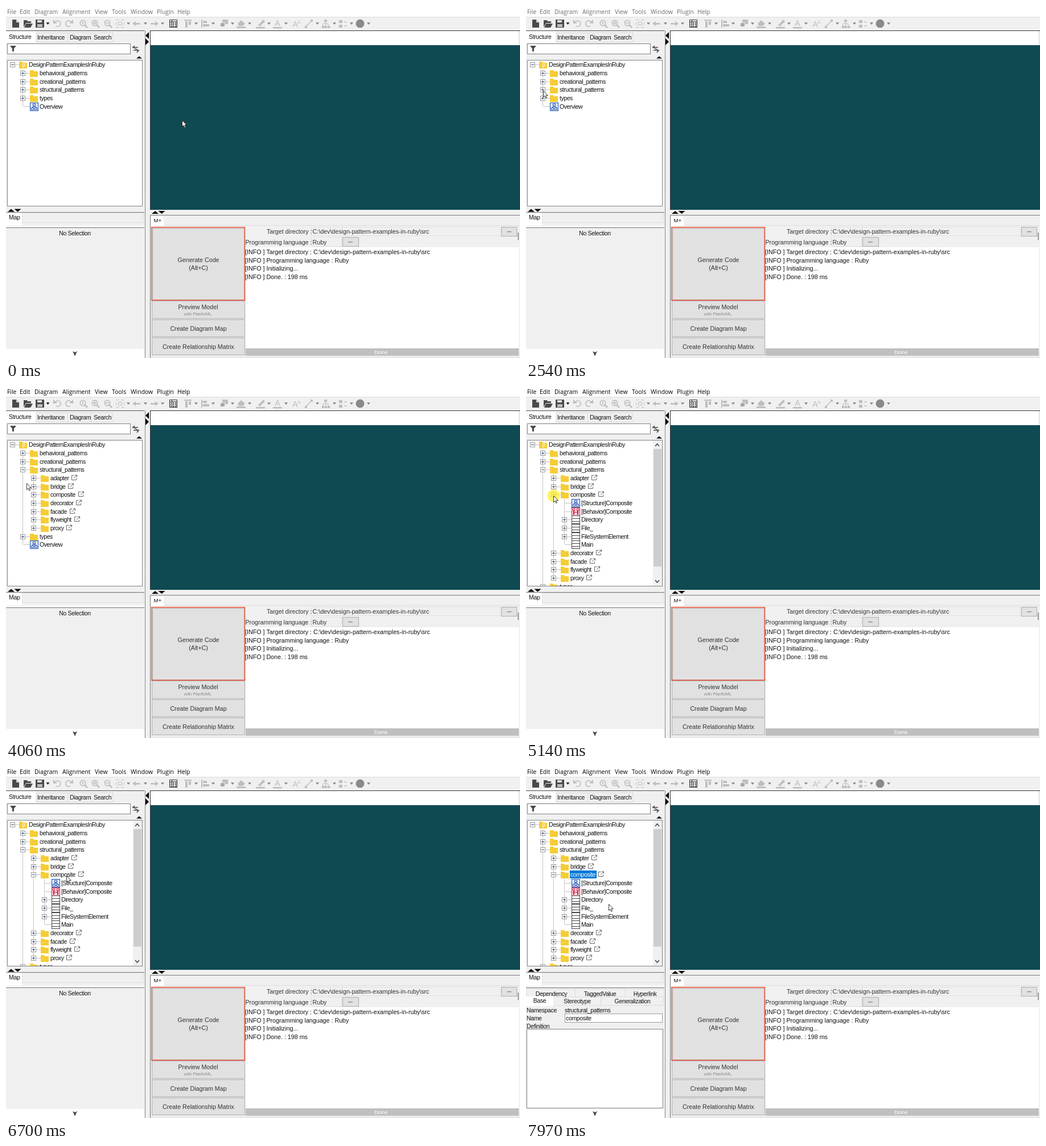
Write an HTML page with a canvas that moves like this. It is 903 by 620 pixels and loops after 8000 ms.

```html
<!DOCTYPE html>
<html lang="en">
<head>
<meta charset="utf-8">
<title>Model tree</title>
<style>
html, body { margin: 0; width: 100%; height: 100%; overflow: hidden; background: #f0f0f0; }
canvas { display: block; }
</style>
</head>
<body>
<canvas id="stage" width="903" height="620"></canvas>
<script>
const LOOP = 8000;
const ctx = document.getElementById('stage').getContext('2d');
const ARIAL = '"Liberation Sans", Arial, sans-serif';
const MENU = '"Open Sans", "Noto Sans", sans-serif';
const PANEL = '#f0f0f0', DARK = '#4a4a4a', PALE = '#bebebe', EDGE = '#828282', SOFT = '#333';

function rect(x, y, w, h, fill, edge) {
  if (fill) { ctx.fillStyle = fill; ctx.fillRect(x, y, w, h); }
  if (edge) { ctx.strokeStyle = edge; ctx.lineWidth = 1; ctx.strokeRect(x + .5, y + .5, w - 1, h - 1); }
}

function poly(points, fill, edge, width = 1, open = false) {
  ctx.beginPath();
  points.forEach(([x, y], i) => i ? ctx.lineTo(x, y) : ctx.moveTo(x, y));
  if (!open) ctx.closePath();
  if (fill) { ctx.fillStyle = fill; ctx.fill(); }
  if (edge) { ctx.strokeStyle = edge; ctx.lineWidth = width; ctx.stroke(); }
}

const line = (x1, y1, x2, y2, color, width = 1) => poly([[x1, y1], [x2, y2]], null, color, width, true);

function ring(x, y, r, color, width, from = 0, to = Math.PI * 2) {
  ctx.beginPath();
  ctx.arc(x, y, r, from, to);
  ctx.strokeStyle = color;
  ctx.lineWidth = width;
  ctx.stroke();
}

function disc(x, y, r, fill) {
  ctx.beginPath();
  ctx.arc(x, y, r, 0, Math.PI * 2);
  ctx.fillStyle = fill;
  ctx.fill();
}

function text(str, x, y, { size = 10.7, color = '#111', align = 'left', spacing = 0, family = ARIAL } = {}) {
  ctx.font = `${size}px ${family}`;
  ctx.letterSpacing = `${spacing}px`;
  ctx.textAlign = align;
  ctx.fillStyle = color;
  ctx.fillText(str, x, y);
}

const label = (str, x, y, align) => text(str, x, y, { size: 10.5, spacing: -.35, align });

// Triangle with its centre at (x, y), pointing along (dx, dy)
function arrowHead(x, y, dx, dy, half, depth, fill) {
  const h = depth / 2;
  poly([[x + dx * h, y + dy * h],
        [x - dx * h - dy * half, y - dy * h + dx * half],
        [x - dx * h + dy * half, y - dy * h - dx * half]], fill);
}

// ---- Menu and toolbar ----

function drawMenu(focused) {
  rect(0, 0, 903, 20, '#fff');
  const items = [['File', 2], ['Edit', 24], ['Diagram', 50], ['Alignment', 99], ['View', 156],
    ['Tools', 186], ['Window', 219], ['Plugin', 265], ['Help', 301]];
  for (const [name, x] of items)
    text(name, x, 14, { size: 10.4, family: MENU, color: focused ? '#000' : '#6d6d6d' });
}

function magnifier(x, sign) {
  ring(x - 1, 30, 4.7, PALE, 1.7);
  line(x + 2.5, 33.5, x + 7, 38, PALE, 2.5);
  if (sign) line(x - 4, 30, x + 2, 30, PALE, 1.5);
  if (sign === '+') line(x - 1, 27, x - 1, 33, PALE, 1.5);
  if (!sign) rect(x - 2, 28, 2, 4, PALE);
}

function drawToolbar() {
  rect(0, 20, 903, 23, PANEL);
  line(0, 19.5, 903, 19.5, '#dcdcdc');
  poly([[11, 24], [18, 24], [23, 29], [23, 38], [11, 38]], DARK);
  poly([[18, 24], [18, 29], [23, 29]], '#d0d0d0');
  poly([[31, 25], [37, 25], [38, 27], [44, 27], [44, 30], [35, 30], [31, 37]], DARK);
  poly([[35, 31], [47, 31], [43, 38], [32, 38]], DARK);
  rect(52, 24, 15, 14, DARK);
  rect(55, 25, 8, 4, '#e4e4e4');
  rect(55, 32, 9, 5, '#bdbdbd');

  ring(91, 31, 5, PALE, 1.6, -2.4, 2.2);
  poly([[83, 24], [83, 31], [90, 30]], PALE);
  ring(110, 31, 5, PALE, 1.6, 1, 5.5);
  poly([[118, 24], [118, 31], [111, 30]], PALE);
  magnifier(136);
  magnifier(157, '+');
  magnifier(179, '-');
  ctx.setLineDash([5, 4]);
  rect(193, 24, 15, 14, null, PALE);
  ctx.setLineDash([]);
  rect(197, 28, 7, 6, PANEL, PALE);
  for (const [x, d] of [[230, -1], [260, 1]]) {
    rect(x - 6, 30, 12, 2.5, PALE);
    arrowHead(x + d * 5, 31, d, 0, 4, 6, PALE);
  }
  rect(287, 24, 14, 14, '#fff', '#333');
  line(287, 27.5, 301, 27.5, '#333');
  line(291.5, 24, 291.5, 38, '#333');
  for (let y = 29; y < 37; y += 3) {
    rect(288.5, y, 2, 1.5, DARK);
    rect(293, y, 2.5, 2, DARK);
    rect(297, y, 2.5, 2, DARK);
  }

  rect(313, 24, 13, 2, PALE);
  rect(315, 27, 4, 11, PALE);
  rect(321, 27, 4, 6, PALE);
  rect(343, 24, 2, 14, PALE);
  rect(346, 26, 7, 4, PALE);
  rect(346, 32, 11, 4, PALE);
  rect(380, 24, 10, 8, PALE);
  rect(376, 29, 9, 8, '#a8a8a8', PANEL);
  poly([[407, 31], [413, 25], [420, 31], [416, 35], [409, 35]], PALE);
  rect(405, 36, 16, 3, PALE);
  poly([[443, 34], [452, 24], [455, 27], [446, 36]], PALE);
  rect(439, 37, 16, 2.5, PALE);
  text('A', 477, 35, { size: 14, color: PALE, align: 'center' });
  rect(469, 37, 16, 2.5, PALE);
  text('A', 508, 37, { size: 14, color: PALE, align: 'center' });
  text('A', 515, 32, { size: 9, color: PALE, align: 'center' });
  line(527, 36, 537, 26, PALE, 1.5);
  rect(525, 35, 4, 4, PALE);
  rect(535, 24, 4, 4, PALE);
  rect(559, 24, 5, 4, PALE);
  poly([[557, 35], [557, 31], [566, 31], [566, 35]], null, PALE, 1, true);
  line(561.5, 27, 561.5, 36, PALE);
  for (const x of [555, 560, 565]) rect(x, 35, 4, 4, PALE);
  rect(585, 25, 6, 5, PALE);
  rect(585, 33, 6, 5, PALE);
  rect(594, 27, 5, 2, '#d0d0d0');
  rect(594, 34, 5, 2, '#d0d0d0');
  disc(622, 31, 7.5, '#8a8a8a');
  arrowHead(73.5, 31, 0, 1, 3, 4, '#222');
  for (const x of [215, 245, 275, 334, 364, 398, 428, 462, 492, 547, 577, 607, 637])
    arrowHead(x, 31, 0, 1, 3, 4, '#888');
}

// ---- Tree ----

const leaf = (level, kind, name, box, link) => ({ level, kind, name, box, link });

function treeRows(openStructural, openComposite) {
  const rows = [
    leaf(0, 'root', 'DesignPatternExamplesInRuby', '-'),
    leaf(1, 'folder', 'behavioral_patterns', '+'),
    leaf(1, 'folder', 'creational_patterns', '+'),
    leaf(1, 'folder', 'structural_patterns', openStructural ? '-' : '+')];
  if (openStructural) {
    for (const name of ['adapter', 'bridge', 'composite', 'decorator', 'facade', 'flyweight', 'proxy']) {
      const open = openComposite && name === 'composite';
      rows.push(leaf(2, 'folder', name, open ? '-' : '+', true));
      if (open) rows.push(
        leaf(3, 'structure', '[Structure]Composite'),
        leaf(3, 'behavior', '[Behavior]Composite'),
        leaf(3, 'class', 'Directory', '+'),
        leaf(3, 'class', 'File_', '+'),
        leaf(3, 'class', 'FileSystemElement', '+'),
        leaf(3, 'class', 'Main'));
    }
  }
  rows.push(leaf(1, 'folder', 'types', '+'), leaf(1, 'structure', 'Overview'));
  return rows;
}

function drawIcon(kind, x, y) {
  if (kind === 'folder' || kind === 'root') {
    poly([[x - 7, y - 5], [x - 1, y - 5], [x, y - 3], [x + 7, y - 3], [x + 7, y + 7], [x - 7, y + 7]], '#f6cd34');
    if (kind === 'root') text('p', x + 1, y + 4, { size: 10, color: '#fff', align: 'center' });
  } else if (kind === 'class') {
    rect(x - 7, y - 7, 15, 15, '#fff', '#444');
    line(x - 7, y - 1.5, x + 8, y - 1.5, '#444');
    line(x - 7, y + 3.5, x + 8, y + 3.5, '#444');
  } else if (kind === 'structure') {
    rect(x - 7, y - 7, 15, 15, '#dce8fb', '#1f4fae');
    rect(x - 2, y - 5, 5, 4, '#fff', '#1f4fae');
    rect(x - 5, y + 2, 5, 4, '#fff', '#1f4fae');
    rect(x + 1, y + 2, 5, 4, '#fff', '#1f4fae');
    poly([[x - 2.5, y + 2], [x - 2.5, y + .5], [x + 3.5, y + .5], [x + 3.5, y + 2]], null, '#1f4fae', 1, true);
    line(x + .5, y - 1, x + .5, y + 1, '#1f4fae');
  } else {
    rect(x - 7, y - 7, 15, 15, '#f9d3dc', '#c8203f');
    rect(x - 5, y - 5, 4, 4, '#fff', '#c8203f');
    rect(x + 2, y - 5, 4, 4, '#fff', '#c8203f');
    line(x - 3, y - 1, x - 3, y + 6, '#c8203f', 2);
    line(x + 4, y - 1, x + 4, y + 6, '#c8203f', 2);
    line(x - 3, y + 1.5, x + 4, y + 1.5, '#c8203f');
  }
}

function drawExpander(x, y, sign) {
  rect(x - 4, y - 4, 9, 9, '#fff', '#9a9a9a');
  line(x - 2, y + .5, x + 3, y + .5, '#3c5078');
  if (sign === '+') line(x + .5, y - 2, x + .5, y + 3, '#3c5078');
}

function drawLink(x, y) {
  poly([[x + 4, y - 4], [x, y - 4], [x, y + 4], [x + 8, y + 4], [x + 8, y + 1]], null, '#666', 1, true);
  line(x + 3.5, y + 1, x + 8.5, y - 4, '#555');
  poly([[x + 5.5, y - 4.5], [x + 9, y - 4.5], [x + 9, y - 1]], null, '#555', 1, true);
}

function drawTree(openStructural, openComposite, selected) {
  rect(2, 95, 238, 258, '#fff', EDGE);
  ctx.save();
  ctx.beginPath();
  ctx.rect(3, 96, 236, 256);
  ctx.clip();
  const rowY = i => Math.round(103.3 + 14.66 * i);
  const rows = treeRows(openStructural, openComposite);
  const lastAt = [];
  rows.forEach(({ level }, i) => {
    const x = 11.5 + 19 * level, y = rowY(i) + .5;
    lastAt[level] = i;
    if (level) line(x - 1, rowY(lastAt[level - 1]) + 8, x - 1, y, '#c4c4c4');
    line(x, y, x + 12, y, '#c4c4c4');
  });
  rows.forEach(({ level, kind, name, box, link }, i) => {
    const dx = 19 * level, y = rowY(i), marked = selected && name === 'composite';
    if (box) drawExpander(11 + dx - (level ? 1 : 0), y, box);
    drawIcon(kind, 30 + dx, y);
    if (marked) rect(77, y - 7, 47, 14, '#0078d7');
    text(name, 40 + dx, y + 4, { size: 10.5, spacing: -.45, color: marked ? '#fff' : '#111' });
    if (link) drawLink(Math.round(40 + dx + ctx.measureText(name).width + 5) + .5, y - .5);
  });
  if (openComposite) {
    rect(223, 96, 16, 256, PANEL);
    rect(224, 111, 14, 207, '#cdcdcd');
    poly([[227, 106], [230.5, 102], [234, 106]], null, '#444', 1.5, true);
    poly([[227, 342], [230.5, 346], [234, 342]], null, '#444', 1.5, true);
  }
  ctx.restore();
}

// ---- Left column ----

function drawStructurePane() {
  rect(0, 43, 244, 320, PANEL);
  line(0, 43.5, 243, 43.5, '#555');
  rect(53, 47, 135, 17, null, '#dadada');
  line(108.5, 47, 108.5, 63, '#dadada');
  line(149.5, 47, 149.5, 63, '#dadada');
  rect(0, 45, 52, 20, '#fff');
  label('Structure', 5, 58);
  label('Inheritance', 55, 59);
  label('Diagram', 112, 59);
  label('Search', 154, 59);
  rect(2, 66, 217, 19, '#fff', EDGE);
  poly([[7, 70], [18, 70], [14, 75], [14, 80], [11, 80], [11, 75]], DARK);
  poly([[226, 70], [223, 73], [232, 73]], null, DARK, 1.6, true);
  poly([[224, 78], [233, 78], [230, 82]], null, DARK, 1.6, true);
  line(224, 73, 232, 78, DARK, 1.3);
  arrowHead(234, 90.5, 0, -1, 5, 4, '#000');
}

function drawMapPane() {
  rect(0, 353, 243, 267, PANEL);
  arrowHead(9, 360, 0, -1, 6, 5, '#000');
  arrowHead(20.5, 360, 0, 1, 6, 5, '#000');
  line(0, 363.5, 243, 363.5, '#777');
  rect(0, 364, 28, 22, '#fff');
  rect(28, 364, 214, 18, null, '#e0e0e0');
  label('Map', 5, 376);
  rect(0, 386, 243, 5, '#f8f8f8');
  line(0, 390.5, 243, 390.5, '#777');
  rect(0, 604, 243, 16, '#fff');
  poly([[117, 608], [121, 610], [125, 608], [121, 617]], DARK);
}

function drawProperties() {
  rect(0, 392, 242, 30, null, '#dcdcdc');
  line(0, 406.5, 241, 406.5, '#dcdcdc');
  for (const [x, y] of [[86.5, 392], [174.5, 392], [131.5, 407]]) line(x, y, x, y + 15, '#dcdcdc');
  rect(0, 406, 48, 17, '#fff');
  label('Dependency', 44.5, 405, 'center');
  label('TaggedValue', 130, 405, 'center');
  label('Hyperlink', 209, 405, 'center');
  label('Base', 24, 417, 'center');
  label('Stereotype', 90, 418, 'center');
  label('Generalization', 187, 418, 'center');
  label('Namespace', 1, 434);
  label('structural_patterns', 68, 434);
  label('Name', 1, 448);
  rect(68, 436, 172, 16, '#fff', '#9a9a9a');
  label('composite', 70, 448);
  label('Definition', 1, 462);
  rect(1, 463, 240, 140, '#fff', EDGE);
}

// ---- Right column ----

function button(x, y, w, h, caption) {
  rect(x, y, w, h, '#e1e1e1', '#adadad');
  if (caption) text(caption, x + w / 2, y + h / 2 + 4, { align: 'center', color: SOFT });
}

function drawWorkArea() {
  rect(244, 43, 10, 577, PANEL);
  line(244.5, 43, 244.5, 620, '#8a8a8a');
  arrowHead(248, 52, -1, 0, 6, 6, '#000');
  arrowHead(248, 63, 1, 0, 6, 6, '#000');
  rect(254, 44, 649, 25, '#fff');
  rect(254, 69, 649, 290, '#0f4a52');
  rect(253, 43, 1, 316, '#333');
  rect(253, 43, 650, 1, '#333');
  rect(901, 44, 1, 25, '#ccc');
  rect(253, 359, 650, 261, PANEL);
  arrowHead(262, 363.5, 0, -1, 6, 5, '#000');
  arrowHead(273.5, 363.5, 0, 1, 6, 5, '#000');
  line(253, 368.5, 903, 368.5, '#777');
  line(253.5, 368, 253.5, 620, '#777');
  rect(254, 369, 23, 18, '#fff');
  text('M+', 259.5, 381, { size: 9.6 });
  line(277, 386.5, 903, 386.5, '#dcdcdc');
  line(254, 618.5, 903, 618.5, '#e0e0e0');
}

function drawGenerator() {
  const centred = { align: 'center', color: SOFT };
  button(257, 391, 162, 127);
  ctx.strokeStyle = '#f4573a';
  ctx.lineWidth = 1.5;
  ctx.strokeRect(255.75, 389.75, 163.75, 128.5);
  text('Generate Code', 338, 451, centred);
  text('(Alt+C)', 338, 465, centred);
  button(256, 519, 164, 32);
  text('Preview Model', 337.5, 534, centred);
  text('with PlantUML', 337, 545, { size: 7.5, color: '#888', align: 'center' });
  button(256, 552, 164, 31, 'Create Diagram Map');
  button(256, 584, 164, 31, 'Create Relationship Matrix');

  const path = 'C:\\dev\\design-pattern-examples-in-ruby\\src';
  rect(536, 389, 333, 16, null, '#e2e2e2');
  rect(536, 407, 54, 17, null, '#e2e2e2');
  text('Target directory :', 537.5, 401, { align: 'right', color: SOFT });
  text(path, 538.5, 401, { color: SOFT });
  text('Programming language :', 537.5, 419.5, { align: 'right', color: SOFT });
  text('Ruby', 538.5, 419.5, { color: SOFT });
  button(870, 389, 28, 17);
  button(591, 407, 29, 17);
  for (let i = 0; i < 3; i++) {
    rect(881 + i * 2.5, 397, 1.3, 1.3, SOFT);
    rect(602 + i * 2.5, 415, 1.3, 1.3, SOFT);
  }
  rect(421, 425, 480, 178, '#fff');
  rect(899, 399, 2, 13, '#999');
  const log = ['Target directory : ' + path, 'Programming language : Ruby', 'Initializing...', 'Done. : 198 ms'];
  log.forEach((entry, i) => text('[INFO ] ' + entry, 420, 437 + Math.round(14.67 * i)));
  rect(421, 603, 480, 13, '#bfbfbf');
  text('Done', 647, 613, { size: 9.8, color: '#fff' });
}

// ---- Pointer ----

// Each move: first and last time, and [step, x, y] knots.
const MOVES = [
  { from: 1080, to: 2540, knots: [[0, 309, 201], [6, 201, 189], [11, 100, 177], [20, 30, 149]] },
  { from: 3610, to: 4760, knots: [[0, 30, 149], [7, 36, 171], [11, 39.5, 187], [16, 48, 193]] },
  { from: 5830, to: 6700, knots: [[0, 48, 193], [11, 105.4, 193], [12, 106, 193]] },
  { from: 7500, to: 7970, knots: [[0, 106, 193], [7, 145, 243]] }
];

// Cubic through the knots, at rest at both ends
function along(knots, step, axis) {
  const last = knots.length - 1;
  const slope = i => i === 0 || i === last ? 0 :
    (knots[i + 1][axis] - knots[i - 1][axis]) / (knots[i + 1][0] - knots[i - 1][0]);
  let i = 0;
  while (i < last - 1 && step > knots[i + 1][0]) i++;
  const [a, b] = [knots[i], knots[i + 1]];
  const span = b[0] - a[0], u = (step - a[0]) / span, v = 1 - u;
  return v * v * (1 + 2 * u) * a[axis] + u * u * (3 - 2 * u) * b[axis]
    + span * u * v * (v * slope(i) - u * slope(i + 1));
}

function pointerAt(t) {
  const move = MOVES.filter(m => t >= m.from).pop();
  if (!move) return [309, 201];
  const { from, to, knots } = move;
  const steps = knots[knots.length - 1][0];
  const pace = (to - from) / (steps - 1);
  const step = Math.min(steps, Math.floor((t - from) / pace + .15) + 1);
  return [1, 2].map(axis => Math.round(along(knots, step, axis)));
}

function drawPointer(t) {
  const [x, y] = pointerAt(t);
  const clicks = [[3000, 3150], [5140, 5220], [6870, 7020]];
  if (clicks.some(([on, off]) => t >= on && t < off)) disc(x + .5, y + .2, 11, 'rgba(255, 240, 40, .7)');
  const outline = [[.5, .5], [.5, 11.6], [3, 9.3], [4.8, 13.4], [6.6, 12.6], [4.9, 8.6], [8.3, 8.6]];
  poly(outline.map(([dx, dy]) => [x + dx, y + dy]), '#fff', '#222', .9);
}

function draw(t) {
  const selected = t >= 6870;
  rect(0, 0, 903, 620, PANEL);
  drawMenu(t >= 3000);
  drawToolbar();
  drawStructurePane();
  drawMapPane();
  drawTree(t >= 3080, t >= 5140, selected);
  if (selected) drawProperties();
  else label('No Selection', 121, 404, 'center');
  drawWorkArea();
  drawGenerator();
  drawPointer(t);
}

const start = performance.now();
function tick() {
  draw((performance.now() - start) % LOOP);
  requestAnimationFrame(tick);
}
tick();
</script>
</body>
</html>
```
